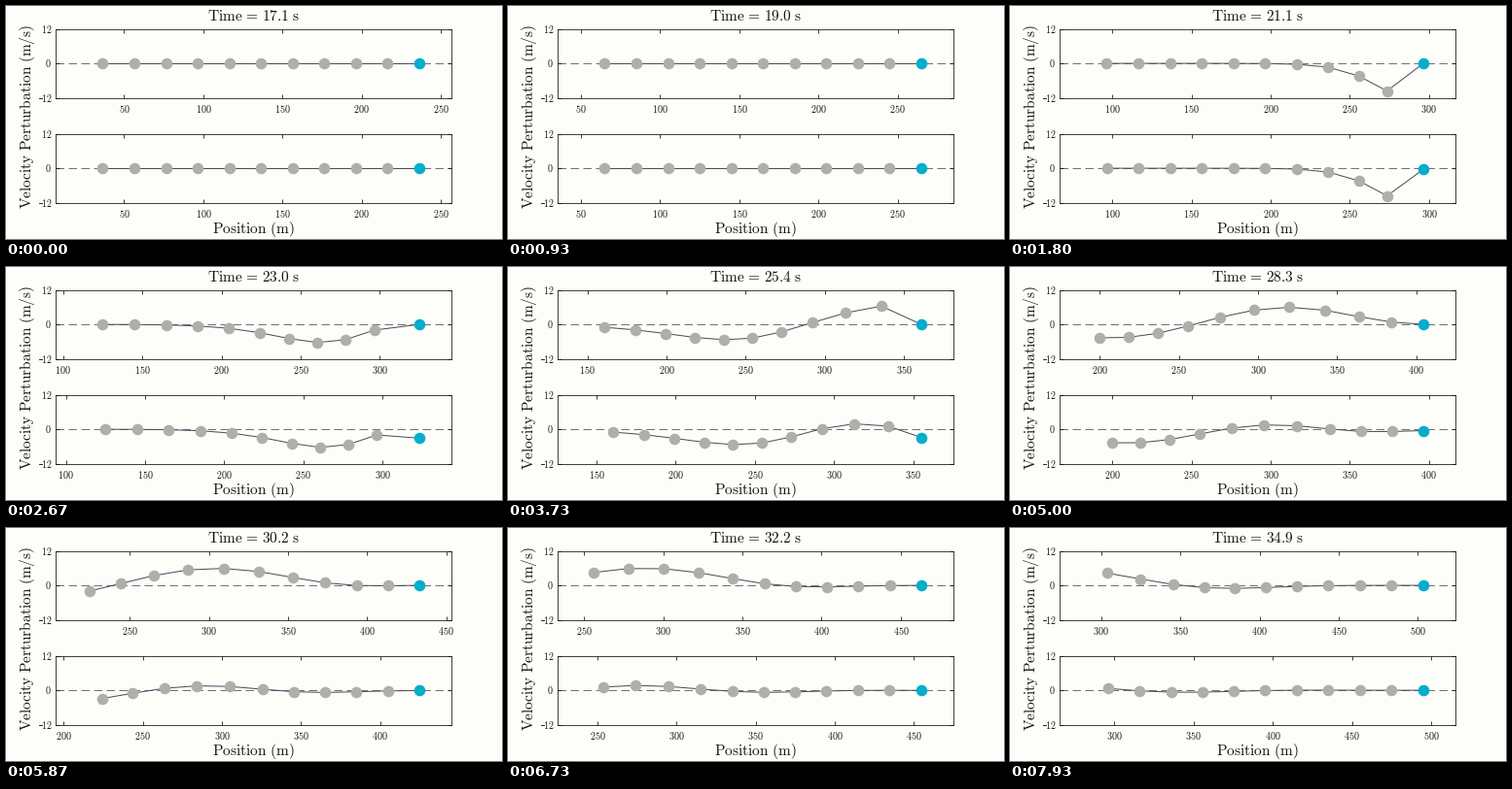
Recreate the animation shown at these times as a matplotlib script. Size 510 by 240 pixels, loop 7990 ms.

```python
import numpy as np
import matplotlib.pyplot as plt
from matplotlib.animation import FuncAnimation
from matplotlib.lines import Line2D
from matplotlib.ticker import MultipleLocator

W, H, DPI = 510, 240, 80
PX = 72 / DPI  # one pixel in points
FRAMES, LOOP = 120, 7990
CARS, V0, GAP, DT = 11, 15, 20, 0.01
BACK, INK = "#fdfdf9", "#14140f"
GREY, TEAL, LINK = "#b0aeaa", "#04aecb", "#56445c"

plt.rcParams["mathtext.fontset"] = "cm"


def rm(text):
    return r"$\mathrm{%s}$" % text.replace(" ", r"\ ")


def title_text(t):
    return r"$\mathrm{Time}\hspace{0.133}=\hspace{0.133}\mathrm{%.1f\ s}$" % t


def simulate(mu, damping=0.55, end=35.2):
    """Optimal-velocity platoon; the leader reacts to the gap behind it by mu."""
    p = -GAP * np.arange(1.0, CARS + 1)
    v = np.full(CARS, float(V0))
    a = np.zeros(CARS)
    log = []
    for k in range(int(round(end / DT)) + 1):
        if k % 10 == 0:
            log.append((p.copy(), v - V0))
        gap = p[:-1] - p[1:]
        want = 15 * (1 - np.cos(np.pi * (np.clip(gap, 5, 35) - 5) / 30))
        a[1:] = np.clip(0.6 * (want - v[1:]) + 0.9 * (v[:-1] - v[1:]), -5, 2)
        a[0] = mu * (gap[0] - GAP) - damping * (v[0] - V0)
        if 2000 <= k < 2100:  # second car brakes for one second
            a[1] = -5
        p = p + v * DT
        v = v + a * DT
    return log


def panel(top, bottom):
    left, right = 50.6, 457.6
    ax = fig.add_axes([left / W, 1 - bottom / H, (right - left) / W, (bottom - top) / H])
    ax.set_facecolor("none")
    ax.set_ylim(-12, 12)
    ax.set_yticks([-12, 0, 12], [rm("12"), rm("0"), rm("12")], va="center")
    ax.xaxis.set_major_locator(MultipleLocator(50))
    ax.xaxis.set_major_formatter(lambda x, _: rm("%d" % round(x)))
    ax.tick_params(direction="in", top=True, right=True, length=4 * PX, width=0.8 * PX,
                   color=INK, labelcolor=INK, labelsize=10 * PX)
    ax.tick_params(axis="x", pad=5 * PX)
    ax.tick_params(axis="y", pad=3.5 * PX)
    for side in ax.spines.values():
        side.set(linewidth=0.8 * PX, edgecolor=INK)
    y = 1 - (bottom + 0.2) / H
    fig.add_artist(Line2D([33.5 / W, 36.5 / W], [y, y], color=INK, lw=0.9 * PX))

    ax.axhline(0, color="#707076", lw=PX, dashes=(8.5, 4.5), zorder=1)
    link, = ax.plot([], [], color=LINK, lw=PX, zorder=3)
    dot = dict(ls="", marker="o", ms=11.6 * PX, mew=0)
    cars, = ax.plot([], [], color=GREY, zorder=4, **dot)
    lead, = ax.plot([], [], color=TEAL, zorder=5, **dot)
    return ax, link, cars, lead


fig = plt.figure(figsize=(W / DPI, H / DPI), dpi=DPI, facecolor=BACK)
big = dict(fontsize=15.4 * PX, color=INK, ha="center", va="baseline")
title = fig.text(254.5 / W, 1 - 15 / H, "", **big)
fig.text(254 / W, 1 - 233.5 / H, rm("Position (m)"), **big)
fig.text(26 / W, 1 - 114 / H, rm("Velocity Perturbation (m/s)"),
         rotation=90, rotation_mode="anchor", **big)

panels = [panel(23.6, 94.6), panel(131.6, 202.6)]
runs = [simulate(0), simulate(-0.21)]


def update(i):
    tick = int(171 + 1.4965 * i)  # tenths of a second
    title.set_text(title_text(tick / 10))
    for (ax, link, cars, lead), run in zip(panels, runs):
        p, dv = run[tick]
        y = 2 * dv
        link.set_data(p, y)
        cars.set_data(p[1:], y[1:])
        lead.set_data(p[:1], y[:1])
        ax.set_xlim(p[0] - 230, p[0] + 20)
    return []


anim = FuncAnimation(fig, update, frames=FRAMES, interval=LOOP / FRAMES, repeat=True)
plt.show()
```
